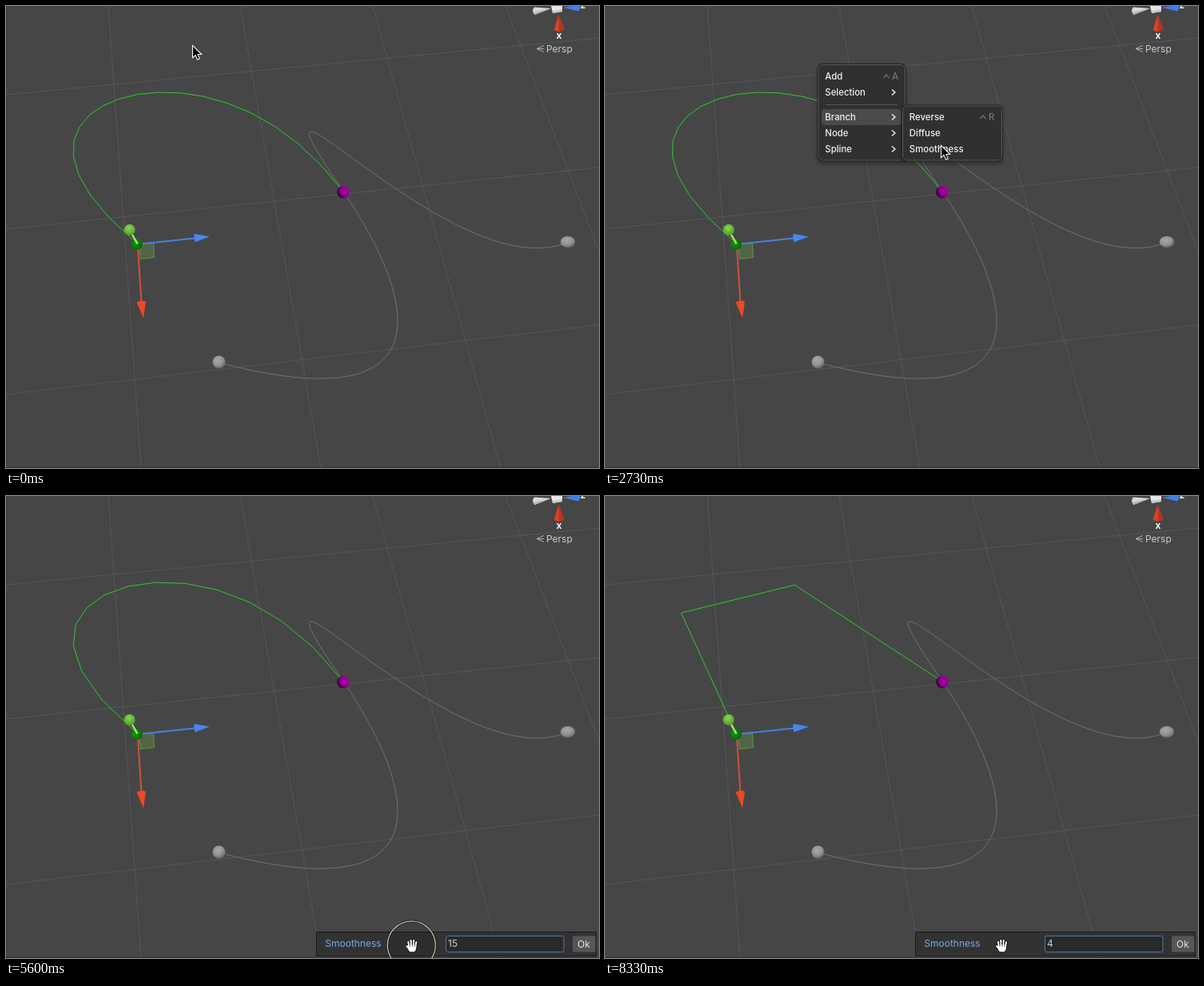
Write an HTML page that moves like this. It is 742x578 px and loops after 8.61 s.

```html
<!DOCTYPE html>
<html lang="en">
<head>
<meta charset="utf-8">
<title>Spline smoothness</title>
<style>
html, body { margin: 0; width: 100%; height: 100%; overflow: hidden; background: #464646; }
svg { display: block; width: 742px; height: 578px; font: 400 12px Inter, sans-serif; }
.line { fill: none; stroke-width: 1; }
.menu { font-size: 11.4px; font-weight: 500; filter: drop-shadow(0 4px 2px rgba(0,0,0,.28)); }
.menu text { fill: #f0f0f0; }
.menu .key { fill: #737373; }
</style>
</head>
<body>
<svg viewBox="0 0 742 578">
  <defs>
    <radialGradient id="grey" cx=".42" cy=".35" r=".65"><stop offset="0" stop-color="#a8a8a8"/><stop offset=".6" stop-color="#939393"/><stop offset="1" stop-color="#666"/></radialGradient>
    <radialGradient id="plum" cx=".7" cy=".4" r=".75"><stop offset="0" stop-color="#a800a8"/><stop offset=".55" stop-color="#8e008e"/><stop offset="1" stop-color="#1c001c"/></radialGradient>
    <radialGradient id="lime" cx=".45" cy=".35" r=".7"><stop offset="0" stop-color="#8ad84e"/><stop offset="1" stop-color="#4f942d"/></radialGradient>
    <radialGradient id="leaf" cx=".35" cy=".4" r=".7"><stop offset="0" stop-color="#109a10"/><stop offset="1" stop-color="#0a620a"/></radialGradient>
  </defs>
  <rect width="742" height="578" fill="#464646"/>
  <path class="line" stroke="#575757" d="M128 0 169 578M293 0 394 578M459 0 619 578M625 0 742 307M0 111 742 40M0 279 742 202M0 486 742 399"/>
  <path class="line" stroke="#727272" d="M422.500 232.500C270 10 560 357 703 295.500M422.500 232.500C525 385 538 518 266 446"/>

  <!-- view compass -->
  <path d="M682 3 661 1.500Q657 6 661.500 11Z" fill="#d8d8d8"/>
  <path d="M682 3 660 8 661.500 11Z" fill="#b4b4b4"/>
  <path d="M682 0H696V7L684 9Z" fill="#e6e6e6"/>
  <path d="M684 6 696 4V7L684 9Z" fill="#c9c9c9"/>
  <path d="M697 2 708 0H718Q719 4 716 6.500Z" fill="#3f7fe6"/>
  <path d="M691.500 11 698.500 29Q692 34 685.500 30Z" fill="#d8432a"/>
  <path d="M691.500 11 698.500 29Q695 32 692 32Z" fill="#b8341f"/>
  <g fill="#f2f2f2" font-weight="700"><text x="688.500" y="41">x</text><text x="718.500" y="3">z</text></g>
  <path class="line" stroke="#b0b0b0" d="M673 49.500 664 53.500 673 57.500M664 53.500H673"/>
  <text x="676" y="57.700" fill="#cacaca">Persp</text>

  <path id="under" class="line" stroke="#0d6a0d" stroke-width="1.500" stroke-dasharray="9 4" transform="translate(.3 1.200)"/>
  <path id="curve" class="line" stroke="#44bc44" transform="translate(.3 .3)"/>

  <!-- move handles -->
  <g transform="translate(.5 .5)">
    <path d="M166 298 184 296 185 314 168 316Z" fill="#6cae48" fill-opacity=".3" stroke="#5d9a40"/>
    <path d="M170 296 186 295" stroke="#a84432" stroke-dasharray="3 2"/>
    <path d="M164.500 302 169 371" stroke="#cf523a" stroke-width="2"/>
    <path d="M163 370Q169 367 174.500 369L171.500 390Z" fill="#ee4926"/>
    <path d="M170 297 236 290" stroke="#4780e0" stroke-width="2"/>
    <path d="M235 284.500 254.500 288 236 295Q234 290 235 284.500Z" fill="#4787ee"/>
    <circle cx="163.500" cy="297.500" r="7" fill="url(#leaf)"/>
    <path d="M156 283 164 297" stroke="#a3e86a" stroke-width="2.500"/>
    <circle cx="154.200" cy="279.500" r="7" fill="url(#lime)"/>
  </g>
  <circle cx="422" cy="232.800" r="7.800" fill="url(#plum)"/>
  <circle cx="266.500" cy="445.500" r="8" fill="url(#grey)"/>
  <ellipse cx="703" cy="295.200" rx="9.200" ry="7.200" fill="url(#grey)"/>
  <rect y="577" width="742" height="1" fill="#332c30"/>

  <!-- value bar -->
  <g id="bar">
    <rect x="388.500" y="545.500" width="350" height="30" fill="#323232" stroke="#1a1a1a"/>
    <text id="label" x="399.300" y="564.300">Smoothness</text>
    <rect id="field" x="550.500" y="550.500" width="147.500" height="20" rx="2.500" fill="#292929"/>
    <text id="value" x="553" y="564.300" fill="#d0d0d0"></text>
    <rect x="709" y="550.500" width="28.500" height="20" rx="2.500" fill="#575757"/>
    <text x="715" y="565" fill="#e6e6e6">Ok</text>
  </g>

  <g id="menu" class="menu"></g>
  <g id="sub" class="menu"></g>

  <g id="ring" fill="none">
    <circle r="30" stroke="#111" stroke-opacity=".45" stroke-width="3.500" fill="#000" fill-opacity=".08"/>
    <circle r="30" stroke="#c6c6c6" stroke-width="1.200"/>
  </g>
  <path id="arrow" d="M0 0V15.500L3.600 12.200 6 17.800 8.800 16.600 6.400 11.200H11.200Z" fill="#000" stroke="#f4f4f4" stroke-width="1.100"/>
  <g id="hand" stroke-linecap="round" stroke-linejoin="round"></g>
</svg>
<script>
const LOOP = 8610, STEP = 70;
const $ = id => document.getElementById(id);
const show = (el, on) => el.setAttribute("display", on ? "inline" : "none");
const move = (el, x, y) => el.setAttribute("transform", `translate(${x} ${y})`);

const hull = [[164, 297], [-25.5, 139.7], [130.3, 78.1], [292.4, 62.2], [422, 232]];

// pointer: time, x, y
const path = [
  [0, 233, 49], [140, 248, 56], [280, 264, 37], [420, 264, 37], [630, 267, 73],
  [840, 267, 74], [910, 280, 80], [1610, 309, 133], [1960, 309, 133],
  [2520, 420, 174], [2870, 420, 174], [3220, 690, 391], [3360, 690, 391],
  [3430, 626, 453], [3920, 534, 562], [4200, 534, 562], [4970, 516, 562],
  [5110, 514, 562], [5250, 514, 562], [5670, 506, 562], [6020, 506, 562],
  [6370, 501, 562], [6580, 499, 562], [7490, 499, 562], [7910, 497, 562],
  [8120, 497, 562], [8330, 496, 562]
];
// smoothness: time, value
const drag = [[0, 20], [5250, 20], [5670, 14], [6020, 14], [6580, 6], [7490, 6], [7910, 4]];

function at(keys, t) {
  let i = 0;
  while (i < keys.length - 1 && keys[i + 1][0] <= t) i++;
  const a = keys[i], b = keys[i + 1];
  if (!b) return a.slice(1);
  const k = (t - a[0]) / (b[0] - a[0]);
  return a.slice(1).map((v, j) => v + (b[j + 1] - v) * k);
}

function bezier(pts, t) {
  if (pts.length === 1) return pts[0];
  const next = pts.slice(1).map((p, i) => p.map((v, j) => pts[i][j] + (v - pts[i][j]) * t));
  return bezier(next, t);
}

function polyline(n) {
  const pts = [];
  for (let i = 0; i < n; i++) pts.push(bezier(hull, i / (n - 1)).map(v => v.toFixed(1)).join(" "));
  return "M" + pts.join("L");
}

// items: [label, row centre, shortcut letter or ">"]
function buildMenu(el, x, y, w, h, items, rule) {
  let s = `<rect x="${x}" y="${y}" width="${w}" height="${h}" rx="6" fill="#303030" stroke="#1c1c1c" stroke-width="2"/>
    <rect x="${x + .5}" y="${y + .5}" width="${w - 1}" height="${h - 1}" rx="5.5" fill="none" stroke="#606060"/>
    <rect class="pick" x="${x + 4.5}" width="${w - 10}" height="20" rx="4"/>`;
  if (rule) s += `<path d="M${x + 9.5} ${rule}H${x + w - 10}" stroke="#555"/>`;
  for (const [name, c, key] of items) {
    const r = x + w;
    s += `<text x="${x + 8.8}" y="${c + 4}">${name}</text>`;
    if (key === ">") s += `<path d="M${r - 17} ${c - 3.5}l4 3.500-4 3.500" fill="none" stroke="#eee" stroke-width="1.400"/>`;
    else if (key) s += `<path d="M${r - 27.500} ${c + 2}l3.500-4 3.500 4" fill="none" stroke="#737373" stroke-width="1.200"/>
      <text class="key" x="${r - 17}" y="${c + 4}">${key}</text>`;
  }
  el.innerHTML = s;
}
const mainRows = [["Add", 88, "A"], ["Selection", 108, ">"], ["Branch", 139, ">"], ["Node", 159, ">"], ["Spline", 179, ">"]];
const subRows = [["Reverse", 139, "R"], ["Diffuse", 159], ["Smoothness", 179]];
buildMenu($("menu"), 266.5, 73, 109.500, 120.500, mainRows, 123.500);
buildMenu($("sub"), 372, 124.500, 125, 69, subRows);

function pick(menu, row, fill = "#1a5fca") {
  const el = menu.querySelector(".pick");
  show(el, !!row);
  if (!row) return;
  el.setAttribute("y", row[1] - 10);
  el.setAttribute("fill", fill);
}
const rowAt = (rows, y) => rows.find(r => y >= r[1] - 10 && y < r[1] + 10);

const fingers = "M-3.500 1-4.500-4.500M-1 0-1.200-6.300M2 0 2.300-6.300M4.200 1 5.500-4M-3 4.500-6.300 1";
const palm = "M-4 0H4.800L4 5 2.500 7H-2L-4 4Z";
$("hand").innerHTML = [["#161616", 4.2], ["#fff", 2.1]].map(([c, w]) =>
  `<path d="${fingers}${palm}" fill="${c}" stroke="${c}" stroke-width="${w}"/>`).join("") +
  `<path d="M-2.600-4V1M.5-4V1M3.500-4V1" stroke="#222" stroke-width=".8"/>`;

let sides = 0;
function draw(ms) {
  const t = Math.floor(ms / STEP) * STEP;
  const [x, y] = at(path, t);
  const n = Math.round(at(drag, t)[0]);
  const hand = t >= 3080, focus = t >= 5110, open = t >= 560 && t < 2940;

  show($("arrow"), !hand);
  show($("hand"), hand);
  move($(hand ? "hand" : "arrow"), x + .5, y + .3);

  show($("menu"), open);
  show($("sub"), open && t >= 1750);
  const inSub = x > 372;
  pick($("menu"), t < 910 || y < 81 ? null : t >= 1750 ? mainRows[2] : rowAt(mainRows, y), inSub ? "#4b4b4b" : undefined);
  pick($("sub"), inSub && t !== 2730 ? rowAt(subRows, y) : null);

  show($("bar"), t >= 2940);
  $("label").setAttribute("fill", focus ? "#7ca9ea" : "#c8c8c8");
  $("field").setAttribute("stroke", focus ? "#437ab3" : "#161616");

  const ring = t < 5040 ? 0 : t < 5110 ? .5 : t < 8190 ? 1 : t < 8260 ? .66 : t < 8330 ? .33 : 0;
  $("ring").setAttribute("opacity", ring);
  move($("ring"), x, y);

  if (n !== sides) {
    sides = n;
    const d = polyline(n);
    $("curve").setAttribute("d", d);
    $("under").setAttribute("d", d);
    $("value").textContent = n;
  }
}

const start = performance.now();
function tick() {
  draw((performance.now() - start) % LOOP);
  requestAnimationFrame(tick);
}
tick();
</script>
</body>
</html>
```
